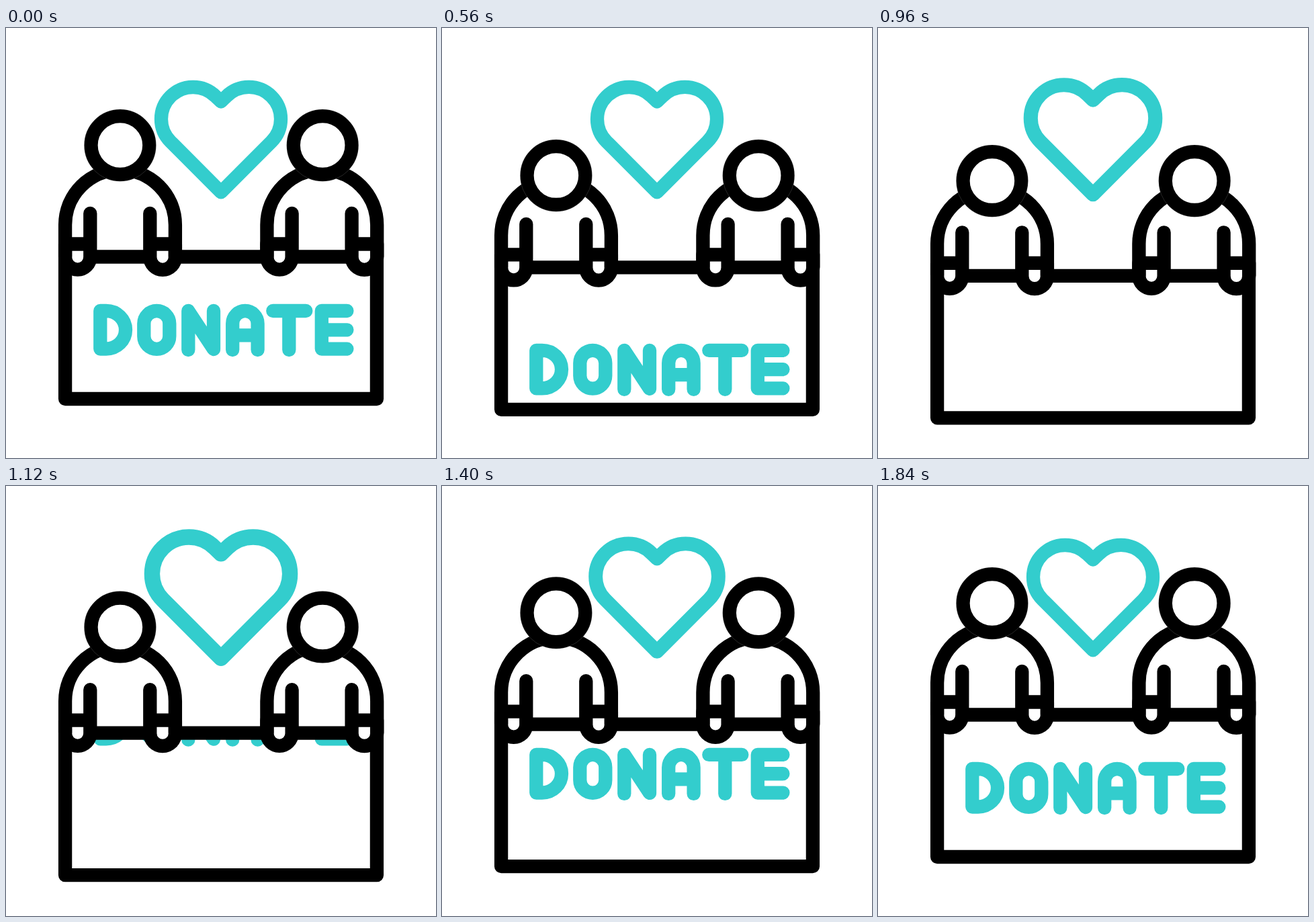
An HTML page that plays this animation: 640 px wide and 640 px high, repeating every 2080 ms.

```html
<!DOCTYPE html>
<html lang="en">
<head>
<meta charset="utf-8">
<title>Donate</title>
<style>
  html, body { margin: 0; width: 100%; height: 100%; overflow: hidden; background: #fff; }
  svg { display: block; width: 100vw; height: 100vh; }
  .line { fill: none; stroke: #000; stroke-width: 20.3; stroke-linecap: round; stroke-linejoin: round; }
  .teal { stroke: #33cdcd; }
  .solid { fill: #fff; }
  .edge { fill: none; stroke: #fff; stroke-width: .5; opacity: .3; }
</style>
</head>
<body>
<svg viewBox="0 0 640 640">
  <defs>
    <clipPath id="panel"><rect x="98" y="350" width="444" height="192"/></clipPath>
    <g id="torso" class="line">
      <path class="solid" d="M125.3 276V341a18.6 18.6 0 0 1-37.2 0V321.5H125.3"/>
      <path class="solid" d="M214.3 276V341a18.8 18.8 0 0 0 37.6 0V321.5H214.3"/>
      <path d="M88.1 340V293a81.9 81.9 0 0 1 163.8 0V340"/>
    </g>
    <g id="face">
      <circle class="line solid" cx="169.9" cy="174.6" r="43.4"/>
      <circle class="edge" cx="169.9" cy="174.6" r="53.6"/>
    </g>
  </defs>

  <path id="heart" class="line teal" d="M320 109.5L312.1 101.9A47.5 47.5 0 1 0 244.9 169.1L320 244.4L395.1 169.1A47.5 47.5 0 1 0 327.9 101.9Z"/>

  <g id="stand">
    <g clip-path="url(#panel)">
      <g id="word" class="line teal" role="img" aria-label="DONATE">
        <path d="M140.3 421H149a29 28.3 0 0 1 0 56.6H140.3Z"/>
        <rect x="205.3" y="421" width="38" height="56.8" rx="19"/>
        <path d="M271.3 479V421L309 478V421"/>
        <path d="M337.2 479V440a18.7 19 0 0 1 37.4 0V479M337.2 457.4H374.6"/>
        <path d="M397.3 421H446.3M421.3 421V479"/>
        <path d="M507.4 421H469.8V477.6H507.4M469.8 449.3H507.4"/>
      </g>
    </g>
    <path class="line" d="M88.1 340.5H551.9V552H88.1Z"/>
    <use href="#torso"/>
    <use href="#torso" x="300.3"/>
    <g id="heads">
      <use href="#face"/>
      <use href="#face" x="301.3"/>
    </g>
  </g>
</svg>

<script>
  const LOOP = 2080, STEP = 40;
  const START = 120, LOW = 960, END = 1840;
  const [heart, stand, word, heads] =
    ["heart", "stand", "word", "heads"].map(id => document.getElementById(id));

  // cubic-bezier(.6, 0, .4, 1)
  function ease(u) {
    if (u <= 0) return 0;
    if (u >= 1) return 1;
    let lo = 0, hi = 1;
    for (let i = 0; i < 24; i++) {
      const s = (lo + hi) / 2, r = 1 - s;
      if (1.8 * s * r * r + 1.2 * s * s * r + s * s * s < u) lo = s; else hi = s;
    }
    return lo * lo * (3 - 2 * lo);
  }

  const ramp = (t, from, to) => ease((t - from) / (to - from));
  const pulse = (t, from, half) => ramp(t, from, from + half) - ramp(t, from + half, from + 2 * half);

  // The word drops out of the panel, then comes back in from above.
  function wordY(t) {
    return t < LOW
      ? 43 * (Math.max(0, t - START) / 440) ** 2.28
      : -35.2 * (Math.max(0, END - t) / 440) ** 2.63;
  }

  const shift = (el, y) => el.setAttribute("transform", `translate(0 ${y.toFixed(2)})`);

  function draw(t) {
    shift(stand, 28.3 * (ramp(t, START, LOW) - ramp(t, LOW, END)));
    shift(heads, 30.2 * (ramp(t, START, 650) - ramp(t, 744, 1370)));
    shift(word, wordY(t));
    const k = 1 + 0.155 * (pulse(t, 872, 221) + pulse(t, 1326, 221));
    heart.setAttribute("transform", `translate(320 166.2) scale(${k.toFixed(4)}) translate(-320 -166.2)`);
  }

  function tick() {
    draw(Math.floor(performance.now() % LOOP / STEP) * STEP);
    requestAnimationFrame(tick);
  }
  tick();
</script>
</body>
</html>
```
